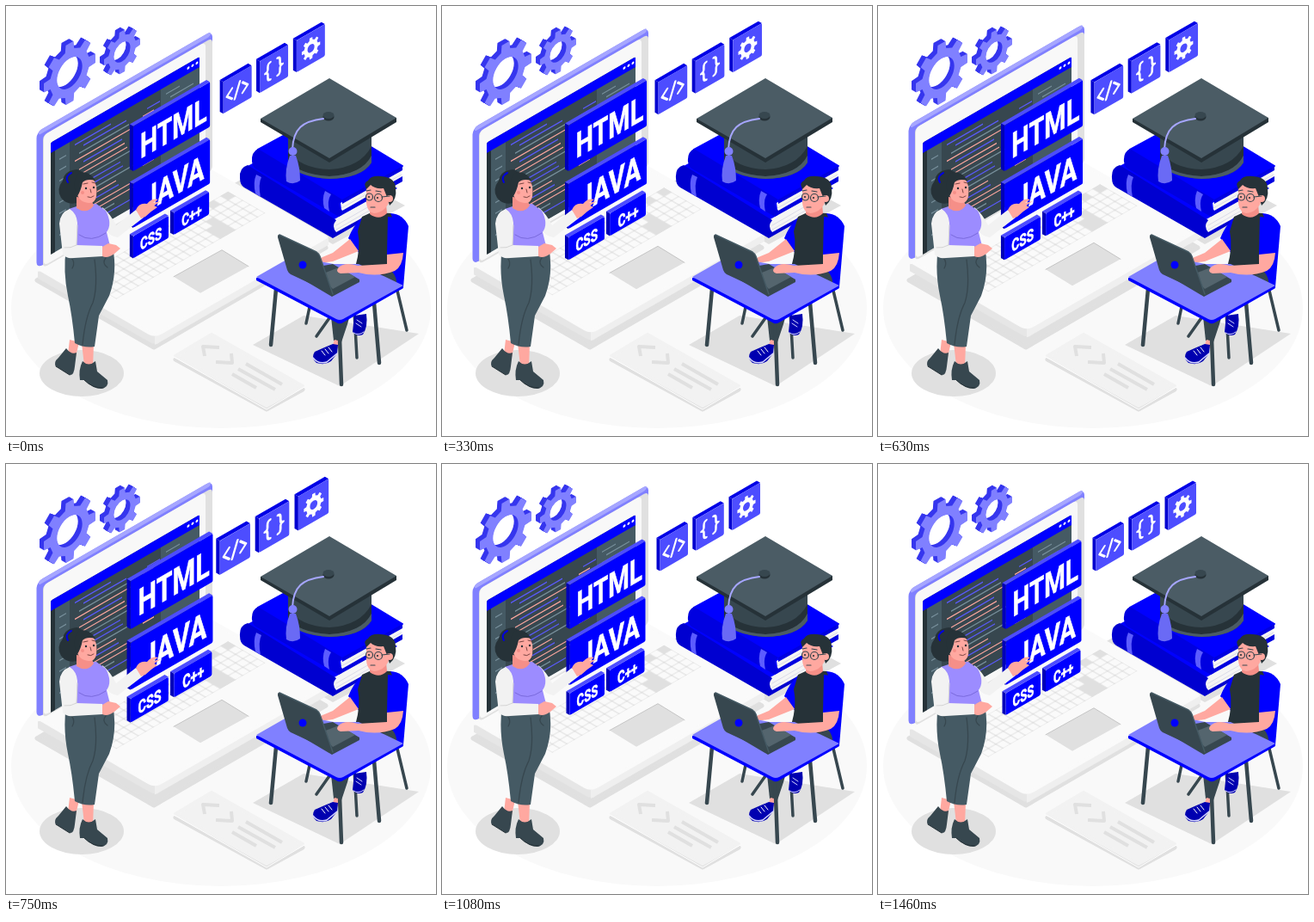
An HTML page that plays this animation: 500x500 px, repeating every 1.5 s.

```html
<!DOCTYPE html>
<html lang="en">
<head>
<meta charset="utf-8">
<title>Learning to code</title>
<style>
  html, body { margin: 0; height: 100%; overflow: hidden; background: #fff; }
  svg { display: block; width: 100vw; height: 100vh; }
  text { font-family: Roboto, sans-serif; font-weight: 700; fill: #fff; stroke: #fff; stroke-width: .6; }
  .line { fill: none; stroke-linecap: round; stroke-linejoin: round; }
</style>
</head>
<body>
<svg viewBox="0 0 500 500">
  <defs>
    <pattern id="keys" width="10" height="10" patternUnits="userSpaceOnUse">
      <path fill="#e0e0e0" d="M0 0h10v10H0z"/>
      <rect x=".6" y=".6" width="8.8" height="8.8" rx="1" fill="#fafafa"/>
    </pattern>
  </defs>

  <!-- floor and shadows -->
  <ellipse cx="250" cy="351" rx="244" ry="140" fill="#f9f9f9"/>
  <g fill="#e0e0e0">
    <ellipse cx="88" cy="427" rx="49" ry="27"/>
    <path d="M287 394 346 360 480 381 388 442z"/>
    <path d="M262 208 340 165 464 232 380 277z"/>
  </g>

  <!-- code tile on the floor -->
  <g stroke-linejoin="round">
    <path d="M197 411 239 384 345 446 303 469z" fill="#e0e0e0" stroke="#e0e0e0" stroke-width="5"/>
    <path d="M197 407 239 382 345 442 303 465z" fill="#f2f2f2" stroke="#f2f2f2" stroke-width="4"/>
    <path class="line" stroke="#fff" d="M195 408 303 469 347 443"/>
    <path fill="none" stroke="#e0e0e0" stroke-width="4"
      d="M248 397 229 396 231 407M262 404 263 415 244 414M279 416 321 440M270 422 313 446M263 428 291 444"/>
  </g>

  <!-- laptop -->
  <path d="M36 319 172 397 372 281 236 203z" fill="#e0e0e0" stroke="#e0e0e0" stroke-width="5" stroke-linejoin="round"/>
  <g id="laptop">
    <path d="M37 309V317L167 391Q173 395 179 391L375 278V268z" fill="#e6e6e6"/>
    <path d="M173 384V394Q177 393 179 391L375 278V268z" fill="#efefef"/>
    <path d="M39 306 166 380Q173 384 180 380L372 269 236 191z" fill="#fafafa" stroke="#fafafa" stroke-width="4" stroke-linejoin="round"/>
    <g transform="matrix(.866 -.5 .866 .5 85 316)">
      <path d="M0 0h200v50H0z" fill="url(#keys)"/>
      <path d="M140 30h20v20h-20zM150 20h10v10h-10zM190 0h10v10h-10zM170 0h10v10h-10z" fill="#e0e0e0"/>
    </g>
    <path d="M195 315 251 284 282 303 226 334z" fill="#e0e0e0"/>
    <path class="line" d="M195 315 251 284 282 303" stroke="#bbb" stroke-width=".8"/>
    <g transform="translate(35.500 147) skewY(-30)">
      <rect width="204.500" height="158.500" rx="7" fill="#8080ff"/>
      <path class="line" d="M5 2.500H200" stroke="#a6a6ff" stroke-width="5"/>
    </g>
    <g transform="translate(43 151) skewY(-30)">
      <rect width="197" height="154" rx="5" fill="#e0e0e0"/>
      <rect x="1" width="188" height="152" rx="5" fill="#f8f8f8"/>
    </g>
  </g>
  <g id="screen" transform="translate(52 159) skewY(-30)">
    <rect width="173" height="130" rx="2" fill="#455a64"/>
    <path d="M22 10h106v120H22z" fill="#37474f"/>
    <path d="M0 10h5v120H0z" fill="#263238"/>
    <path d="M0 12V2q0-2 2-2h169q2 0 2 2v10z" fill="#00f"/>
    <g fill="#fff"><circle cx="160" cy="5.500" r="1.500"/><circle cx="165" cy="5.500" r="1.500"/><circle cx="170" cy="5.500" r="1.500"/></g>
  </g>

  <g id="gears"></g>
  <g id="icons"></g>

  <!-- books -->
  <g>
    <path d="M281 186 350 150 455 212 382 252z" fill="#00f"/>
    <path d="M380 249 424 224 424 244 382 268z" fill="#f5f5f5"/>
    <path class="line" d="M384 255 424 232M384 260 424 237" stroke="#d5d5e5" stroke-width=".8"/>
    <path d="M281 185Q271 188 272 200Q272 208 277 211L380 270 424 245 424 241 384 263Q378 256 384 249z" fill="#0000d0"/>
    <path d="M291 196 297 199Q293 207 296 222L290 218Q287 205 291 196z" fill="#5c5cff"/>
    <path d="M293 167 365 128 461 186 391 225z" fill="#00f" stroke="#00f" stroke-width="2" stroke-linejoin="round"/>
    <path d="M389 229 460 190 459 204 391 243z" fill="#f5f5f5"/>
    <path class="line" d="M390 235 460 196" stroke="#d5d5e5" stroke-width=".8"/>
    <path d="M293 166Q285 170 286 181Q287 188 292 190L387 245 461 204 461 198 391 238Q384 231 391 225z" fill="#0000e0"/>
    <path d="M391 225 461 186 461 191 391 230z" fill="#0000e0"/>
    <path d="M371 215 378 219Q373 226 376 239L370 235Q367 224 371 215z" fill="#5c5cff"/>
  </g>

  <!-- graduation cap -->
  <g>
    <path d="M328 148V182Q338 199 376 201Q414 200 425 182V146z" fill="#37474f"/>
    <path d="M328 168Q342 189 376 190Q412 188 425 163V174Q414 196 376 198Q340 196 328 180z" fill="#263238"/>
    <path d="M328 179Q340 196 376 198Q414 196 425 174V182Q414 200 376 201Q338 199 328 182z" fill="#4b5c65"/>
    <path d="M296 131V135L376 182 454 135V130z" fill="#263238"/>
    <path d="M296 131 376 84 454 130 376 177z" fill="#4b5c65"/>
    <ellipse cx="375" cy="129" rx="6.500" ry="4.500" fill="#263238"/>
    <ellipse cx="375" cy="127" rx="6.500" ry="4" fill="#37474f"/>
    <path class="line" d="M369 131C345 134 334 142 333 167" stroke="#a6a6ff" stroke-width="2"/>
    <path d="M330 174Q324 190 326 204Q334 209 342 203Q342 187 337 174z" fill="#6a6af5"/>
    <circle cx="333.500" cy="169" r="5" fill="#8080ff"/>
  </g>

  <g id="labels"></g>

  <!-- student at the table -->
  <g>
    <path class="line" d="M353 350 349 369M378 360 361 384M455 331 466 377M405 355 408 409" stroke="#37474f" stroke-width="3.500"/>
    <path d="M377 352 404 345 397 370 390 391 381 389z" fill="#37474f"/>
    <path d="M382 388 390 390 388 398 379 397z" fill="#ffa8a0"/>
    <path d="M380 393Q370 397 359 402Q354 409 361 415Q371 418 378 413L385 404 386 394z" fill="#0000b0"/>
    <path class="line" d="M357 409Q363 417 373 414L385 404" stroke="#d7d7ff" stroke-width="1.500"/>
    <path class="line" d="M371 399 375 404M367 401 371 406M375 397 379 402" stroke="#fff"/>
    <path d="M405 360 419 358Q421 373 415 382Q408 385 403 379z" fill="#0000b0"/>
    <path class="line" d="M404 380Q410 384 416 379M408 365 414 369M407 369 413 373" stroke="#d7d7ff"/>

    <path d="M447 241Q462 242 468 256L462 327Q459 331 453 331L440 300z" fill="#00f"/>
    <path d="M405 315 442 303Q456 312 454 326L429 340z" fill="#37474f"/>
    <path d="M414 246Q404 255 398 270L411 288 423 265z" fill="#00f"/>
    <path d="M400 271 410 285 380 297 365 299Q362 295 368 292L380 287z" fill="#ffa8a0"/>
    <path d="M414 245 425 240 447 241Q456 258 448 309Q426 321 406 304Q413 280 409 262z" fill="#263238"/>
    <path d="M444 245Q462 246 465 262L462 288Q453 293 443 289z" fill="#00f"/>
    <path d="M424 232 442 230 443 241Q434 250 423 242z" fill="#f58f88"/>
    <path d="M419 210Q420 203 433 204Q447 206 447 224Q442 240 428 241Q418 239 419 223z" fill="#ffa8a0"/>
    <path d="M419 213Q415 205 421 203Q424 197 436 198Q452 199 453 211Q455 225 446 232L443 222 439 212Q429 213 424 208z" fill="#263238"/>
    <circle cx="446" cy="224" r="4" fill="#ffa8a0"/>
    <g class="line" stroke="#37474f" stroke-width="1.200">
      <circle cx="422.500" cy="222" r="4"/><circle cx="433" cy="223" r="4.500"/>
      <path d="M437 222 446 221M419 215 424 214M430 215 436 216M424 234 429 234"/>
    </g>
    <g fill="#263238"><circle cx="422" cy="222" r="1.100"/><circle cx="432" cy="223" r="1.100"/></g>

    <path class="line" d="M314 329 308 394M387 360 390 440M428 345 434 415" stroke="#37474f" stroke-width="4.500"/>
    <path d="M291 316V319L386 369Q389 370 392 368L462 328V324z" fill="#00f"/>
    <path d="M291 315 333 291 381 300 410 300 462 325 392 364Q388 366 384 364z" fill="#8080ff"/>
    <path d="M330 309 380 300 411 318V321L379 338z" fill="#37474f"/>
    <path d="M364 313 387 304 406 315 380 329z" fill="#54656e"/>
    <path d="M318 266 361 286Q364 288 365 291L380 335 331 312Q328 310 327 307L316 269Q316 265 318 266z" fill="#37474f"/>
    <path class="line" d="M318 266 361 286Q364 288 365 291L380 335" stroke="#455a64" stroke-width="1.500"/>
    <circle cx="345" cy="301" r="4.500" fill="#00f"/>
    <path d="M443 289 462 287Q461 303 452 308Q432 316 410 310L389 311Q383 309 386 305Q393 297 409 302L443 300z" fill="#ffa8a0"/>
  </g>

  <!-- teacher -->
  <g>
    <path d="M74 388 85 391 81 408 72 405zM88 392 102 393 101 421 91 418z" fill="#ffa8a0"/>
    <path d="M70 398Q76 406 82 403L80 419Q79 430 74 429L58 419Q55 414 61 409z" fill="#37474f"/>
    <path d="M89 413Q96 420 104 413L106 425 118 435Q120 443 111 445Q101 445 91 435L86 435Q84 423 89 413z" fill="#37474f"/>
    <path class="line" d="M58 419 74 429M91 435Q101 445 113 444" stroke="#263238"/>
    <path d="M70 281 124 280Q130 310 120 337L108 360 103 396Q91 398 80 392Q77 360 72 337 66 308 70 281z" fill="#455a64"/>
    <path class="line" d="M103 295Q107 326 101 345 92 362 89 394M76 293Q81 298 77 305M116 293Q111 299 118 304" stroke="#37474f" stroke-width="1.300"/>

    <path d="M83 190Q68 191 66 203Q58 213 64 223Q71 232 82 229L104 227 106 214 99 198z" fill="#263238"/>
    <path class="line" d="M76 194Q68 198 72 205" stroke="#0000e0" stroke-width="2"/>
    <path d="M112 234Q121 241 128 255L151 237 160 246 130 269Q121 269 113 256z" fill="#f2f2f2"/>
    <path d="M151 237Q155 228 164 230Q170 223 177 225L171 229 180 227 172 232 176 234Q168 239 162 245L157 247z" fill="#ffa8a0"/>
    <path d="M73 236 88 231 105 230 116 238Q124 253 117 263L121 279Q96 290 72 280z" fill="#9c8cff"/>
    <path class="line" d="M85 266Q99 276 116 264" stroke="#7a6add"/>
    <path d="M82 222 99 225 102 232Q94 243 82 235z" fill="#f58f88"/>
    <path d="M83 203Q91 195 101 201Q107 208 105 222Q103 230 96 229Q84 228 82 216z" fill="#ffa8a0"/>
    <path d="M81 217Q77 204 84 195Q96 190 104 203Q94 200 89 205Q87 215 83 221z" fill="#263238"/>
    <path d="M74 236Q63 240 62 253L66 289Q70 294 79 293L113 291 112 279 82 278 83 252Q82 241 74 236z" fill="#f2f2f2"/>
    <path class="line" d="M82 278 83 255M68 281Q75 282 82 278" stroke="#d5d5d5"/>
    <path d="M112 280 119 276 128 278 133 282 126 288Q118 294 112 291z" fill="#ffa8a0"/>
    <g fill="#263238"><circle cx="93" cy="212" r="1.200"/><circle cx="102" cy="211" r="1.200"/></g>
    <path class="line" d="M90 207 95 206M100 205 104 206M98 213 99 217M95 222Q99 224 102 221" stroke="#6b3a38" stroke-width=".9"/>
    <circle cx="89" cy="217" r="2" fill="#f58f88"/>
  </g>
</svg>

<script>
const LOOP = 1500, PHASE = 20;
const SLOPE = Math.tan(Math.PI / 6);
const $ = id => document.getElementById(id);
const poly = (points, fill) => `<path d="M${points.join(' ')}z" fill="${fill}"/>`;
const wall = (x, y, body) => `<g transform="translate(${x} ${y}) skewY(-30)">${body}</g>`;

// x, y: top-left corner of the front face
function panel(x, y, w, h, [face, top, side]) {
  const r = x + w, yr = y - w * SLOPE, d = 4, e = 2.3;
  return poly([x, y, x - d, y - e, r - d, yr - e, r, yr], top)
    + poly([x, y, x - d, y - e, x - d, y + h - e, x, y + h], side)
    + wall(x, y, `<rect width="${w}" height="${h}" rx="1.5" fill="${face}"/>`);
}

function gearPath(r, hole) {
  const points = [];
  for (let i = 0; i < 8; i++)
    for (const [turn, k] of [[-.29, .76], [-.19, 1], [.19, 1], [.29, .76]]) {
      const a = (i + turn) * Math.PI / 4;
      points.push((r * k * Math.cos(a)).toFixed(2), (r * k * Math.sin(a)).toFixed(2));
    }
  return `M${points.join(' ')}zM${hole} 0a${hole} ${hole} 0 1 0 ${-2 * hole} 0a${hole} ${hole} 0 1 0 ${2 * hole} 0z`;
}

const gear = (x, y, r, hole, fill) =>
  `<path transform="matrix(.866 -.5 0 1 ${x} ${y})" fill-rule="evenodd" d="${gearPath(r, hole)}" fill="${fill}"/>`;

function solidGear(x, y, r, hole) {
  let out = '';
  for (let d = 5; d > 0; d -= .5) out += gear(x - d, y - d * SLOPE, r, hole, '#3636ee');
  return out + gear(x, y, r, hole, '#8080ff');
}

const word = (x, y, size, label) =>
  `<text transform="matrix(.71 -.41 0 1 ${x} ${y})" font-size="${size}">${label}</text>`;

const glyph = (x, y, d) =>
  wall(x, y, `<path class="line" stroke="#fff" stroke-width="2.5" d="${d}"/>`);

$('gears').innerHTML = solidGear(74, 78, 35, 17) + solidGear(135, 53.5, 24.5, 11);

const pale = ['#4d4dff', '#0000e6', '#0000d0'];
$('icons').innerHTML =
  panel(253.5, 88, 32.5, 36.5, pale) + panel(295.3, 64.3, 32.5, 36.5, pale) + panel(337.5, 40.5, 32.5, 36.5, pale)
  + glyph(269.5, 97, 'M-6-5-12 1-6 7M3-8-3 9M6-5 12 1 6 7')
  + glyph(311.5, 73, 'M-4-10q-3 0-3 4v3q0 3-3 3q3 0 3 3v3q0 4 3 4M4-10q3 0 3 4v3q0 3 3 3q-3 0-3 3v3q0 4-3 4')
  + gear(354, 49.5, 12.3, 4.6, '#fff');

const vivid = ['#00f', '#4d4dff', '#0000b8'];
$('labels').innerHTML =
  panel(148.5, 206.5, 88, 50.5, vivid) + panel(148.5, 140.5, 88, 51.5, vivid)
  + panel(148.5, 266.5, 40.5, 25.5, vivid) + panel(195, 239.5, 40.5, 25.5, vivid)
  + word(156.5, 178, 39.5, 'HTML') + word(160.5, 240.5, 39.5, 'JAVA')
  + word(156.5, 283, 18.7, 'CSS') + word(204, 256, 18.7, 'C++');

// editor text: rows of coloured strokes
let code = '';
const bar = (x, y, w, color) => code += `<path d="M${x} ${y}h${w}v1.4h${-w}z" fill="${color}"/>`;
const colors = ['#5a5aff', '#5a5aff', '#78909c', '#ffa8a0', '#5a5aff', '#ffa8a0', '#ffa8a0', '#78909c'];
for (let i = 0; i < 17; i++) {
  const y = 18 + i * 6.3, indent = 28 + i * 5 % 3 * 5;
  bar(indent, y, 42 + i * 37 % 29, colors[i % 8]);
  if (i % 3) bar(indent + 74, y, 8 + i * 7 % 9, colors[(i + 3) % 8]);
  if (i % 2) bar(10, y, 8, '#78909c');
  if (i < 9) bar(134 + i % 2 * 5, y + 2, 16 + i * 11 % 14, '#78909c');
}
$('screen').insertAdjacentHTML('beforeend', code);

// double heartbeat, linear between stops
const beat = [[0, 1], [.1, 1.1], [.3, 1], [.4, 1], [.5, 1.1], [.6, 1], [1, 1]];
function beatScale(p) {
  const i = beat.findIndex(stop => stop[0] > p);
  const [p0, s0] = beat[i - 1], [p1, s1] = beat[i];
  return s0 + (s1 - s0) * (p - p0) / (p1 - p0);
}

const scaleAbout = (id, x, y, s) =>
  $(id).setAttribute('transform', `translate(${x} ${y}) scale(${s}) translate(${-x} ${-y})`);

function draw() {
  const p = (performance.now() + PHASE) % LOOP / LOOP;
  const s = beatScale(p);
  $('laptop').setAttribute('transform', `translate(0 ${-10 * (1 - Math.abs(2 * p - 1))})`);
  scaleAbout('labels', 190.5, 191, s);
  scaleAbout('icons', 310, 72.5, s);
  requestAnimationFrame(draw);
}
draw();
</script>
</body>
</html>
```
